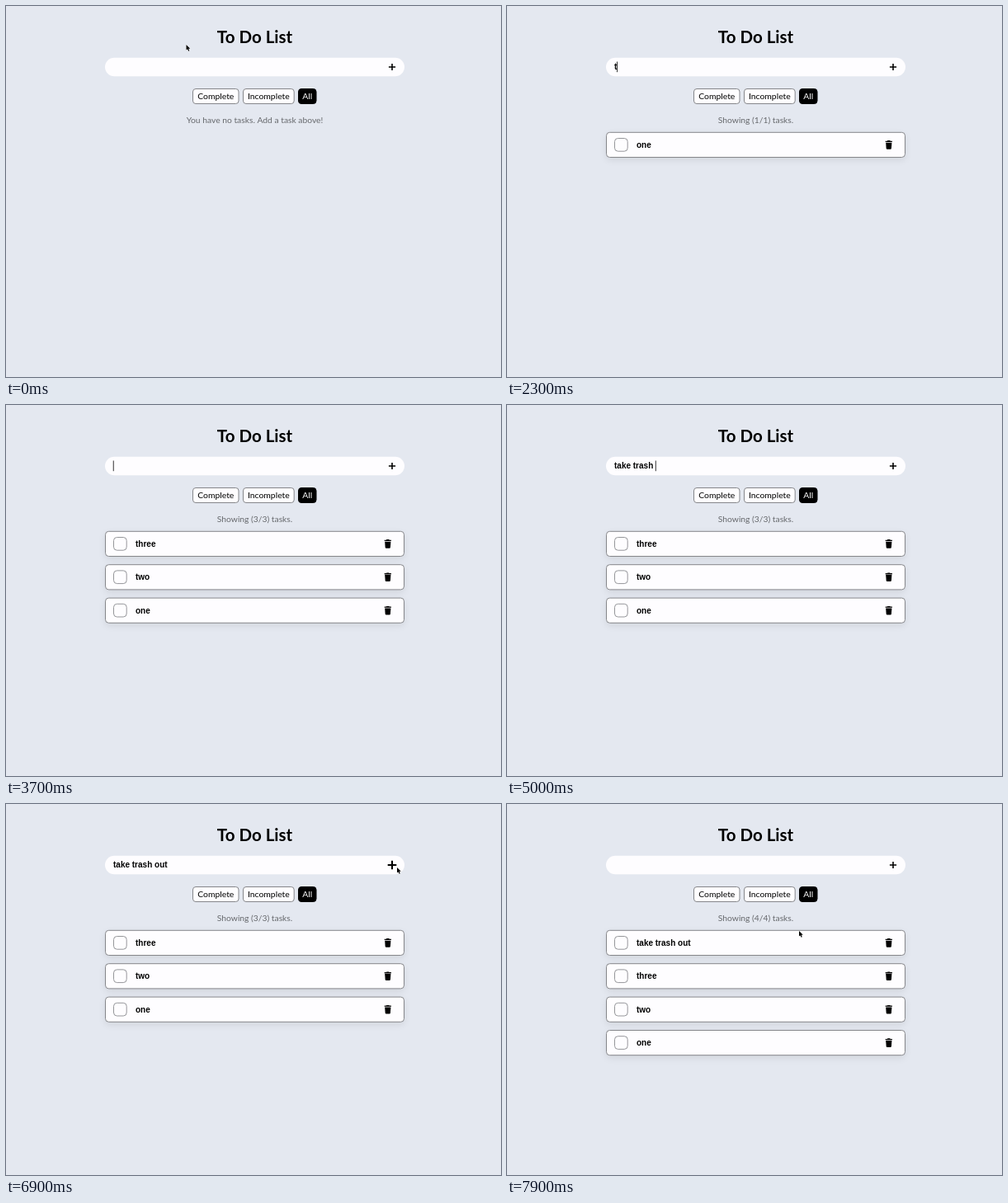
Write an HTML page with a canvas that moves like this. It is 600 px wide and 450 px high and loops after 8 s.

```html
<!DOCTYPE html>
<html lang="en">
<head>
<meta charset="utf-8">
<title>To Do List</title>
<style>
html, body { margin: 0; width: 600px; height: 450px; overflow: hidden; background: #e4e8f0; }
canvas { display: block; }
</style>
</head>
<body>
<canvas id="stage" width="600" height="450"></canvas>
<script>
const ctx = document.getElementById('stage').getContext('2d');
const SANS = 'Lato, sans-serif', FIELD = 'bold 10px "Liberation Sans", Arial, sans-serif';
const PAPER = '#fefdff';

// [time, text in the field]
const typed = [
  [0, ''], [800, ''], [1600, 'o'], [1700, 'on'], [1800, 'one'],
  [2000, ''], [2300, 't'], [2400, 'tw'], [2500, 'two'],
  [2700, ''], [3000, 't'], [3200, 'th'], [3300, 'thr'], [3400, 'thre'], [3600, 'three'],
  [3700, ''], [4100, 't'], [4200, 'ta'], [4300, 'tak'], [4400, 'take'], [4500, 'take '],
  [4600, 'take t'], [4800, 'take tra'], [4900, 'take tras'], [5000, 'take trash '],
  [5200, 'take trash o'], [5300, 'take trash out'], [7100, '']
];
const added = [[2000, 'one'], [2700, 'two'], [3700, 'three'], [7100, 'take trash out']];

// [time, x, y] of the mouse; hidden while typing
const mouse = [
  [0, 218.5, 47], [100, 218.5, 53], [200, 219.5, 70], [300, 219.5, 71], [500, 219.5, 71],
  [600, 219.5, 70], [800, 219, 71], [5900, 219, 71], [6200, 270, 77], [6500, 400, 95],
  [6600, 440, 103], [6800, 474, 77], [7400, 474, 77], [7600, 435, 103], [7900, 354, 154]
];

function box(x, y, w, h, r, fill, stroke) {
  ctx.beginPath();
  ctx.roundRect(x, y, w, h, r);
  ctx.fillStyle = fill;
  ctx.fill();
  if (stroke) {
    ctx.shadowColor = 'transparent';
    ctx.strokeStyle = stroke;
    ctx.lineWidth = 1;
    ctx.stroke();
  }
}

function label(str, x, y, font, color = '#000', align = 'center') {
  ctx.font = font;
  ctx.fillStyle = color;
  ctx.textAlign = align;
  ctx.fillText(str, x, y);
}

function button(str, x, w, active) {
  box(x, 100.5, w, 18, 3.5, active ? '#000' : PAPER, active ? '#000' : '#85868a');
  label(str, x + w / 2, 113, '10.4px ' + SANS, active ? '#fff' : '#000');
}

function plus(big) {
  const r = big ? 5.3 : 4.1;
  ctx.strokeStyle = '#000';
  ctx.lineWidth = big ? 2 : 1.6;
  ctx.beginPath();
  ctx.moveTo(468 - r, 74);
  ctx.lineTo(468 + r, 74);
  ctx.moveTo(468, 74 - r);
  ctx.lineTo(468, 74 + r);
  ctx.stroke();
}

function task(str, y) {
  ctx.save();
  ctx.shadowColor = 'rgba(0,0,0,.09)';
  ctx.shadowBlur = 10;
  ctx.shadowOffsetY = 3;
  box(120.5, y + .3, 362, 30.2, 4, PAPER, '#85868a');
  ctx.restore();
  box(130.5, y + 7.5, 15.7, 15.7, 4, PAPER, '#95969a');
  label(str, 157, y + 19, FIELD, '#000', 'left');
  box(458.6, y + 10.7, 8.4, 1.3, .4, '#000');
  box(461, y + 10.1, 3.6, 1.2, .4, '#000');
  ctx.fill(new Path2D(`M459.2 ${y + 12.7}h7.2l-.5 7q-.1 1-1.1 1h-4q-1 0-1.1-1z`));
}

function pointer(t) {
  if (t >= 1600 && t < 6000) return;
  const i = Math.max(1, mouse.findIndex(m => m[0] >= t));
  const [t0, x0, y0] = mouse[i - 1], [t1, x1, y1] = mouse[i];
  const p = (t - t0) / (t1 - t0), x = x0 + (x1 - x0) * p, y = y0 + (y1 - y0) * p;
  ctx.save();
  ctx.translate(x, y);
  if (y > 63 && y < 85 && x < 455) {
    ctx.strokeStyle = '#333';
    ctx.lineWidth = .8;
    ctx.stroke(new Path2D('M-1.6 -4.6q1.6 0 1.6 1.2v6.8q0 1.2 1.6 1.2M1.6 -4.6q-1.6 0-1.6 1.2M0 3.4q0 1.2-1.6 1.2'));
  } else {
    const arrow = new Path2D('M0 0v6.6l1.5-1.4 1.1 2.6 1.2-.5-1.1-2.5h2.1z');
    ctx.strokeStyle = '#fff';
    ctx.lineWidth = 1;
    ctx.stroke(arrow);
    ctx.fillStyle = '#000';
    ctx.fill(arrow);
  }
  ctx.restore();
}

function draw(t) {
  const [since, text] = typed.findLast(e => e[0] <= t);
  const tasks = added.filter(a => a[0] <= t).reverse();
  const n = tasks.length;

  ctx.fillStyle = '#e4e8f0';
  ctx.fillRect(0, 0, 600, 450);
  label('To Do List', 301.5, 45, 'bold 20.5px ' + SANS);

  box(120, 62.7, 363, 22.6, 11.3, PAPER);
  label(text, 130, 77.3, FIELD, '#000', 'left');
  const caretOn = Math.floor((t - since + 30) / 530) % 2 === 0;
  if (t >= 800 && t < 7100 && caretOn) {
    ctx.fillRect(129.8 + ctx.measureText(text).width, 67.5, .8, 12.7);
  }
  plus(t >= 6800 && t < 7500);

  button('Complete', 226.5, 55.5);
  button('Incomplete', 287.5, 61.7);
  button('All', 354.5, 21.5, true);
  label(n ? `Showing (${n}/${n}) tasks.` : 'You have no tasks. Add a task above!',
    301.5, 142, '10.3px ' + SANS, '#66686c');

  tasks.forEach((a, i) => task(a[1], 153 + 40.4 * i));
  pointer(t);
}

function frame(now) {
  draw(Math.floor(now % 8000 / 100) * 100);
  requestAnimationFrame(frame);
}
requestAnimationFrame(frame);
</script>
</body>
</html>
```
